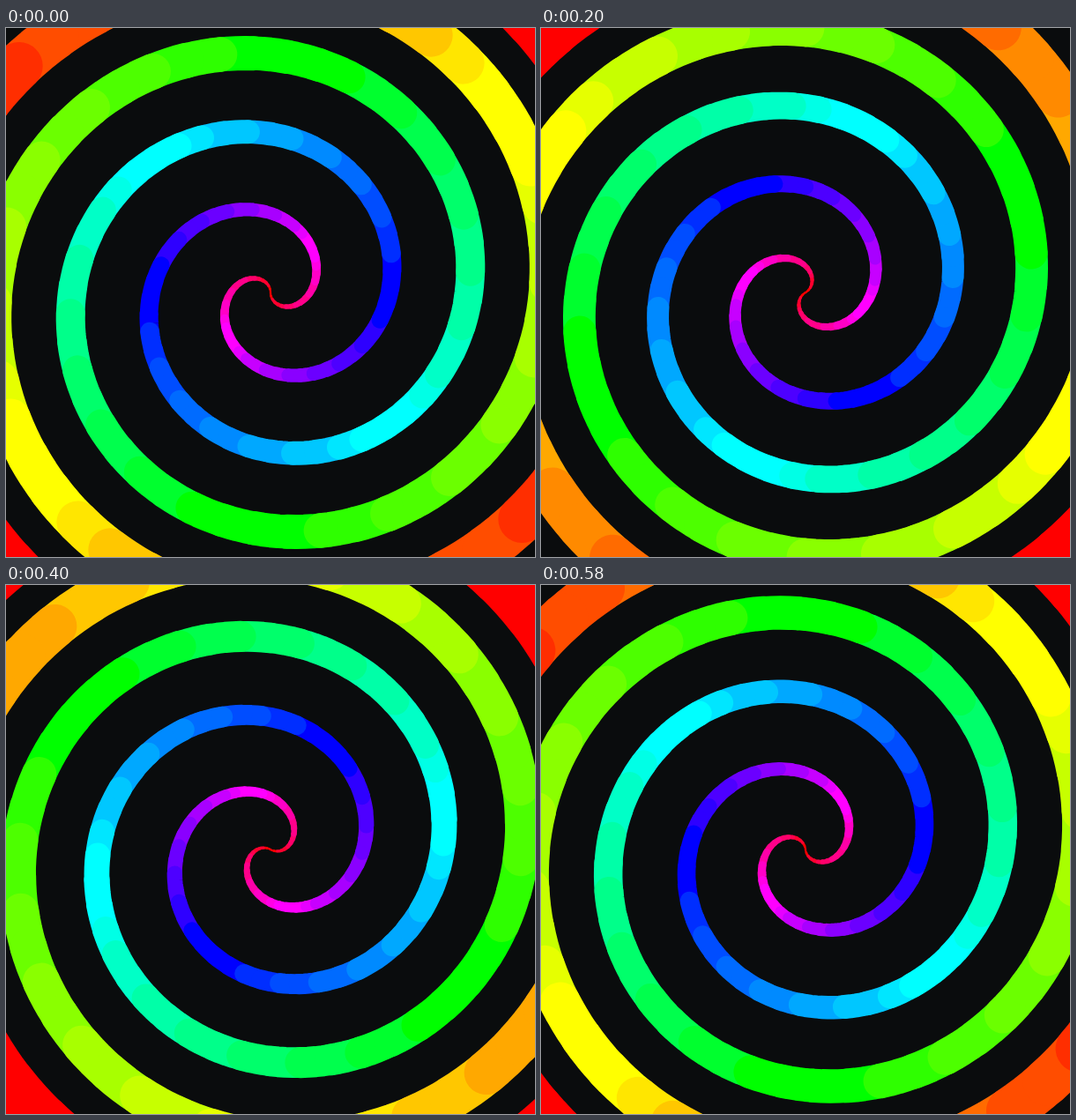
Animation of 600 by 600 pixels, one loop 600 ms. Source, as an HTML page with a canvas:

```html
<!DOCTYPE html>
<html lang="en">
<head>
<meta charset="utf-8">
<title>Rainbow spiral</title>
<style>
  html, body { margin: 0; width: 100%; height: 100%; overflow: hidden; background: #0a0c0d; }
  canvas { display: block; width: 600px; height: 600px; }
</style>
</head>
<body>
<canvas id="stage" width="600" height="600"></canvas>
<script>
const ctx = document.getElementById('stage').getContext('2d');
const LOOP = 600, TICK = 20;
const STEP = 8;          // degrees per segment
const SEGMENTS = 120;
const RAD = Math.PI / 180;

// Coarse colour levels give the visible bands
function level(v) {
  if (v < 30.6) return 0;
  if (v > 230) return 255;
  return Math.round((Math.floor(v / 30.6) + 0.5) * 30.6);
}

function hueColor(hue) {
  const channel = n => {
    const k = (n + hue / 60) % 6;
    return level(255 * (1 - Math.max(0, Math.min(k, 4 - k, 1))));
  };
  return `rgb(${channel(5)},${channel(3)},${channel(1)})`;
}

// Archimedean spiral: half a pixel of radius per degree, starting upwards
function point(deg) {
  const r = deg / 2;
  return [-r * Math.sin(deg * RAD), -r * Math.cos(deg * RAD)];
}

const segments = Array.from({ length: SEGMENTS }, (_, i) => {
  const path = new Path2D();
  for (let d = 0; d <= STEP; d += 2) path.lineTo(...point(i * STEP + d));
  return {
    path,
    width: 2 + 0.54 * (i + 0.5),
    color: hueColor(Math.max(0, 360 - 3.6 * i))
  };
});

function drawArm(deg) {
  ctx.save();
  ctx.translate(300, 300);
  ctx.rotate(deg * RAD);
  for (const s of segments) {
    ctx.lineWidth = s.width;
    ctx.strokeStyle = s.color;
    ctx.stroke(s.path);
  }
  ctx.restore();
}

function draw(time) {
  const turn = Math.floor((time % LOOP) / TICK) * TICK / LOOP * 180;
  ctx.fillStyle = '#0a0c0d';
  ctx.fillRect(0, 0, 600, 600);
  ctx.lineCap = ctx.lineJoin = 'round';
  drawArm(turn);
  drawArm(turn + 180);
}

const start = performance.now();
function loop() {
  draw(performance.now() - start);
  requestAnimationFrame(loop);
}
loop();
</script>
</body>
</html>
```
